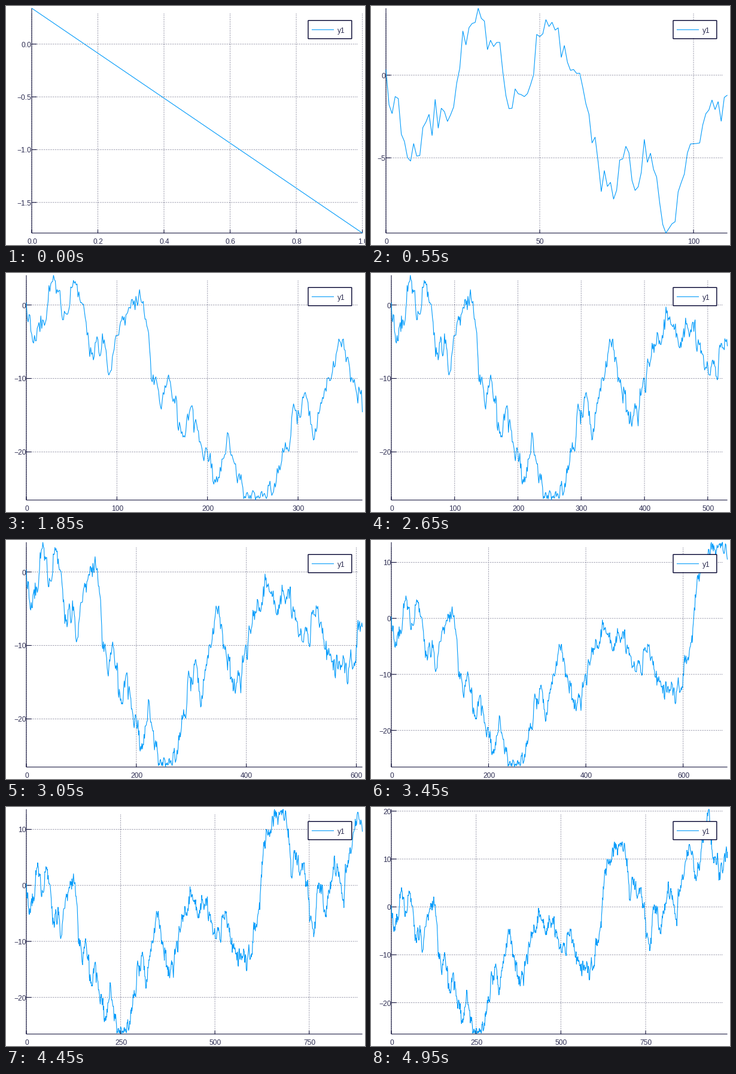
These frames come from a looping animation (600x400 px, 5000 ms). A matplotlib script:

```python
import math

import numpy as np
import matplotlib.pyplot as plt
from matplotlib.animation import FuncAnimation
from matplotlib.collections import LineCollection
from matplotlib.patches import Rectangle

W, H, DPI = 600, 400, 100
FRAMES, INTERVAL = 100, 50
PX = 72 / DPI
INK, BLUE = "#00002d", "#009afa"
TOP, BOTTOM, RIGHT = 3.7, 380, 595.6
NICE = [(1.0, 1.0), (5.0, 0.9), (2.0, 0.7), (2.5, 0.5), (3.0, 0.2)]

# Main turning points of the walk; seeded noise fills in the rest.
TURNS = [(0, .34), (1, -1.79), (8, -5.2), (20, -2.8), (30, 4.05), (41, -2),
         (54, 3.2), (74, -7.5), (79, -4.7), (91, -9.55), (106, -1.5),
         (121, 1.2), (149, -14.2), (157, -9.5), (175, -18), (182, -13.8),
         (207, -24.4), (227, -20.4), (253, -26.55), (270, -25.2),
         (309, -12.5), (317, -18.4), (344, -5.6), (377, -15.9), (418, -5.5),
         (446, -2.6), (516, -10), (529, -5), (556, -12.2), (587, -12.9),
         (611, -7.5), (635, 8.2), (681, 13.6), (702, 1.5), (737, 4),
         (764, -8.4), (771, -1.3), (791, -4.3), (816, 5), (841, -2.5),
         (878, 13), (904, 9.3), (936, 20.4), (943, 13), (968, 7.2),
         (991, 11.5)]

plt.rcParams["font.family"] = "Liberation Sans"


def make_walk():
    """Jagged path through the turning points that sets records only there."""
    xs, ys = np.array(TURNS).T
    steps = np.arange(int(xs[-1]) + 1)
    rng = np.random.default_rng(4)
    noise = np.zeros(len(steps))
    for i in steps[1:]:
        noise[i] = .8 * noise[i - 1] + rng.normal(0, .85)
    noise -= np.interp(steps, xs, noise[xs.astype(int)])
    walk = np.interp(steps, xs, ys) + noise
    ahead = np.searchsorted(xs, steps)
    high = np.maximum.accumulate(ys)[ahead]
    low = np.minimum.accumulate(ys)[ahead]
    walk = high - abs(high - walk)
    return low + abs(walk - low)


def nice_ticks(low, high):
    """Tick values scored by count, zero, coverage and niceness."""
    span = high - low
    best, found = -math.inf, (1, 0, 4)
    # Equal scores keep the earlier candidate only above a span of one.
    margin = 1e-9 if span > 1 else -1e-9
    top = math.ceil(math.log10(span))
    for z in range(top, top - 3, -1):
        for k in range(4, 9):
            for q, nice in NICE:
                step = q * 10.0 ** z
                width = (k - 1) * step
                r = math.ceil((high - width) / step)
                while r * step <= low:
                    count = 1 - abs(k - 5) / 5
                    zero = 1 if r <= 0 and abs(r) < k else 0
                    cover = 1.5 * span / width
                    score = count / 4 + zero / 6 + cover / 3 + nice / 4
                    if width >= 2 * span:
                        score -= 1000
                    if score > best + margin:
                        best, found = score, (step, r, k)
                    r += 1
    step, r, k = found
    ticks = [(r + i) * step for i in range(k)]
    return [t for t in ticks if low - 1e-9 <= t <= high + 1e-9]


def tick_labels(ticks):
    digits = next(d for d in range(5)
                  if all(abs(round(t, d) - t) < 1e-9 for t in ticks))
    return [f"{t + 0:.{digits}f}".replace("-", "\u2212") for t in ticks]


walk = make_walk()

fig = plt.figure(figsize=(W / DPI, H / DPI), dpi=DPI, facecolor="white")
ax = fig.add_axes([0, 0, 1, 1])
ax.set(xlim=(0, W), ylim=(H, 0))
ax.axis("off")


def segments(alpha=1, dash="solid", z=1):
    group = LineCollection([], colors=INK, linewidths=PX, alpha=alpha,
                           linestyles=dash, zorder=z, snap=False)
    return ax.add_collection(group, autolim=False)


def label(x, y, s, ha, z=2):
    return ax.text(x, y, s, ha=ha, va="center_baseline", color=INK,
                   fontsize=12 * PX, alpha=.82, zorder=z)


def set_labels(pool, items):
    for text in pool:
        text.set_text("")
    for text, (x, y, s) in zip(pool, items):
        text.set_position((x, y))
        text.set_text(s)


grid = segments(.7, (0, (1, 2)))
frame = segments(z=2)
curve, = ax.plot([], [], color=BLUE, lw=1.1 * PX, zorder=3,
                 solid_joinstyle="miter", solid_capstyle="butt")
x_labels = [label(0, 0, "", "center") for _ in range(10)]
y_labels = [label(0, 0, "", "right") for _ in range(10)]

ax.add_patch(Rectangle((505, 24.3), 72.8, 30.4, fc="white", ec=INK,
                       lw=1.4 * PX, zorder=4, snap=False))
ax.plot([511.5, 547.5], [39.7, 39.7], color=BLUE, lw=1.1 * PX, zorder=5,
        snap=False)
label(554, 40.5, "y1", "left", 5)


def draw(i):
    last = 10 * i + 1
    data = walk[:last + 1]
    low, high = data.min(), data.max()
    x_ticks, y_ticks = nice_ticks(0, last), nice_ticks(low, high)
    x_names, y_names = tick_labels(x_ticks), tick_labels(y_ticks)
    left = 7 + 9 * max(map(len, y_names))

    def to_x(v):
        return left + (RIGHT - left) * np.asarray(v) / last

    def to_y(v):
        return TOP + (BOTTOM - TOP) * (high - np.asarray(v)) / (high - low)

    px, py = to_x(x_ticks), to_y(y_ticks)
    curve.set_data(to_x(np.arange(last + 1)), to_y(data))
    grid.set_segments([[(x, BOTTOM), (x, 11)] for x in px]
                      + [[(left, y), (588, y)] for y in py])
    frame.set_segments([[(left, TOP), (left, BOTTOM)],
                        [(left, BOTTOM), (RIGHT, BOTTOM)]]
                       + [[(x, BOTTOM), (x, BOTTOM - 5.5)] for x in px]
                       + [[(left, y), (left + 8.5, y)] for y in py])
    set_labels(x_labels, [(x + .5, 393, s) for x, s in zip(px, x_names)])
    set_labels(y_labels, [(left - .5, y + .5, s) for y, s in zip(py, y_names)])
    return [grid, frame, curve, *x_labels, *y_labels]


anim = FuncAnimation(fig, draw, frames=FRAMES, interval=INTERVAL,
                     init_func=lambda: draw(0), repeat=True, repeat_delay=0)
plt.show()
```
